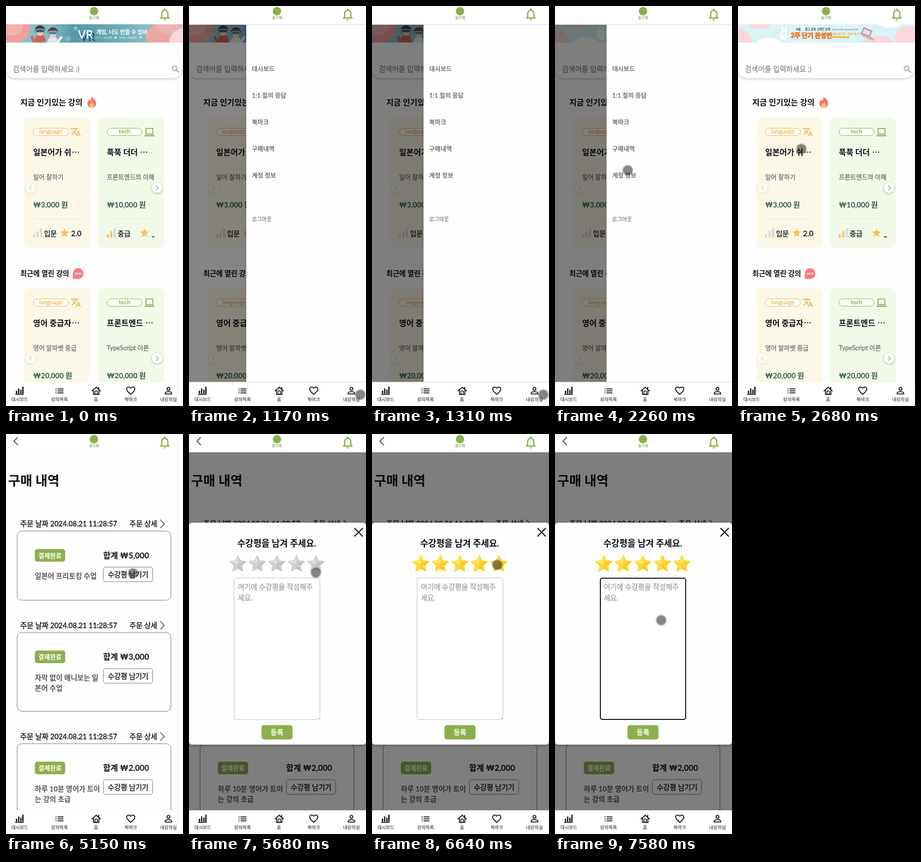
An HTML page with a canvas that plays this animation: 359 px wide and 810 px high, repeating every 8000 ms.

```html
<!DOCTYPE html>
<html lang="ko">
<head>
<meta charset="utf-8">
<title>강의 앱</title>
<style>
html, body { margin: 0; width: 100%; height: 100%; overflow: hidden; background: #fefefe; }
canvas { display: block; width: 100vw; height: 100vh; }
</style>
</head>
<body>
<canvas id="stage"></canvas>
<script>
const W = 359, H = 810, TOP = 37, BOTTOM = 762, LOOP = 8000;
const PAGE = '#fefefe', INK = '#0b0f19', GREEN = '#8ab04d', AMBER = '#edb550', GOLD = '#f7c35f', GREY = '#d9d9d9';
const FONT = 'Lato, "Noto Sans CJK KR", "Noto Sans CJK JP", "Noto Sans CJK", sans-serif';
const canvas = document.getElementById('stage');
const c = canvas.getContext('2d');

const ICONS = {
  bell: 'M12 22c1.1 0 2-.9 2-2h-4c0 1.1.9 2 2 2zm6-6v-5c0-3.07-1.63-5.64-4.5-6.32V4c0-.83-.67-1.5-1.5-1.5s-1.5.67-1.5 1.5v.68C7.64 5.36 6 7.92 6 11v5l-2 2v1h16v-1l-2-2zm-2 1H8v-6c0-2.48 1.51-4.5 4-4.5s4 2.02 4 4.5v6z',
  heart: 'M16.5 3c-1.74 0-3.41.81-4.5 2.09C10.91 3.81 9.24 3 7.5 3 4.42 3 2 5.42 2 8.5c0 3.78 3.4 6.86 8.55 11.54L12 21.35l1.45-1.32C18.6 15.36 22 12.28 22 8.5 22 5.42 19.58 3 16.5 3zm-4.4 15.55l-.1.1-.1-.1C7.14 14.24 4 11.39 4 8.5 4 6.5 5.5 5 7.5 5c1.54 0 3.04.99 3.57 2.36h1.87C13.46 5.99 14.96 5 16.5 5c2 0 3.5 1.5 3.5 3.5 0 2.89-3.14 5.74-7.9 10.05z',
  person: 'M12 5.9a2.1 2.1 0 1 1 0 4.2 2.1 2.1 0 0 1 0-4.2m0 9c2.97 0 6.1 1.46 6.1 2.1v1.1H5.9V17c0-.64 3.13-2.1 6.1-2.1M12 4a4 4 0 1 0 0 8 4 4 0 0 0 0-8zm0 9c-2.67 0-8 1.34-8 4v3h16v-3c0-2.66-5.33-4-8-4z',
  translate: 'M12.87 15.07l-2.54-2.51.03-.03c1.74-1.94 2.98-4.17 3.71-6.53H17V4h-7V2H8v2H1v1.99h11.17C11.5 7.92 10.44 9.75 9 11.35 8.07 10.32 7.3 9.19 6.69 8h-2c.73 1.63 1.73 3.17 2.98 4.56l-5.09 5.02L4 19l5-5 3.11 3.11.76-2.04zM18.5 10h-2L12 22h2l1.12-3h4.75L21 22h2l-4.5-12zm-2.62 7l1.62-4.33L19.12 17h-3.24z',
  laptop: 'M3 3h18v15H3zM5 5h14v11H5zM0.500 19.500h23v2.500h-23z',
  star: 'M12 17.27L18.18 21l-1.64-7.03L22 9.24l-7.19-.61L12 2 9.19 8.63 2 9.24l5.46 4.73L5.82 21z',
  flame: 'M11 1C16 4 21.5 9 21 15.5 20.5 21 16.5 24 12 24 7 24 3 20.5 3 15.5 3 11.5 5.5 9.5 6 6.5 7.5 7 8 8.5 8.2 10 10.5 8 11.5 5 11 1z',
  ember: 'M12.5 11C15 13 17 16 17 19 17 22 15 24 12 24 9 24 7 22 7 19.5 7 17 8.5 16 9 14.5 10 15 10.5 15.5 10.7 16.5 12 15 12.7 13 12.5 11z'
};
for (const k in ICONS) ICONS[k] = new Path2D(ICONS[k]);

const clamp = v => Math.max(0, Math.min(1, v));
const lerp = (a, b, k) => a + (b - a) * k;
const span = (t, a, b) => clamp((t - a) / (b - a));
const easeOut = k => 1 - (1 - k) ** 3;
const easeInOut = k => k * k * (3 - 2 * k);

function rect(x, y, w, h, color) { c.fillStyle = color; c.fillRect(x, y, w, h); }
function box(x, y, w, h, r, fill, stroke, lw = 1) {
  c.beginPath(); c.roundRect(x, y, w, h, r);
  if (fill) { c.fillStyle = fill; c.fill(); }
  if (stroke) { c.strokeStyle = stroke; c.lineWidth = lw; c.stroke(); }
}
function oval(x, y, rx, ry, color, turn = 0) {
  c.beginPath(); c.ellipse(x, y, rx, ry, turn, 0, 7); c.fillStyle = color; c.fill();
}
const dot = (x, y, r, color) => oval(x, y, r, r, color);
function line(color, lw, ...p) {
  c.beginPath();
  for (let i = 0; i < p.length; i += 2) c.lineTo(p[i], p[i + 1]);
  c.strokeStyle = color; c.lineWidth = lw; c.stroke();
}
// y is the optical middle of the line; a thin outline stands in for the medium weight
function text(s, x, y, size, color, weight = 400, align = 'left') {
  const base = y + size * 0.37;
  c.font = `${weight === 500 ? 400 : weight} ${size}px ${FONT}`;
  c.textAlign = align; c.fillStyle = color;
  c.fillText(s, x, base);
  if (weight === 500) {
    c.strokeStyle = color; c.lineWidth = size * 0.022;
    c.strokeText(s, x, base);
  }
}
function icon(name, x, y, scale, color) {
  c.save();
  c.translate(x, y); c.scale(scale, scale); c.translate(-12, -12);
  c.fillStyle = color; c.fill(ICONS[name], 'evenodd');
  c.restore();
}
function shadow(color, blur, dy) {
  const k = c.getTransform().a;
  c.shadowColor = color; c.shadowBlur = blur * k; c.shadowOffsetY = dy * k;
}
function clipped(x, y, w, h, draw) {
  c.save(); c.beginPath(); c.rect(x, y, w, h); c.clip(); draw(); c.restore();
}

function kid(x, y, hair, shirt, goggles) {
  oval(x, y + 19, 11, 11, shirt);
  oval(x, y - 1, 10.5, 10, hair);
  oval(x, y + 4, 7.5, 6.5, '#f4c4ab');
  box(x - 9, y - 3, 18, 7, 3, goggles, '#f0f4f2', 1);
}
function gameBanner() {
  const g = c.createLinearGradient(0, 0, W, 0);
  g.addColorStop(0, '#8fc6cf'); g.addColorStop(0.26, '#80bcc7');
  g.addColorStop(0.38, '#5698a9'); g.addColorStop(0.6, '#69a9b6'); g.addColorStop(1, '#a9d3d6');
  rect(0, TOP, W, 37, g);
  oval(14, 47, 35, 27, '#ef9f9c');
  oval(7, 41, 28, 19, '#f2b3ad');
  oval(345, 62, 62, 34, '#eaa6a0');
  oval(338, 42, 34, 15, '#e6b5af');
  dot(126, 66, 5, '#7cb6c4'); dot(141, 45, 4, '#8bc0cb');
  line('#d8605b', 5, 58, 76, 52, 61);
  line('#e9efed', 5, 103, 76, 113, 62);
  kid(69, 50, '#4a3740', '#d3625c', '#37607a');
  kid(95, 54, '#5f4140', '#dce9e6', '#438ba0');
  text('VR', 151, 62, 23, '#173a72');
  text('VR', 146, 57.5, 22.5, '#ffffff', 700);
  text('게임, 너도 만들 수 있어', 183, 53, 11, '#ffffff', 900);
  text('C++ - 24,000', 183, 63.5, 5.5, '#eef7f7');
  text('JAVA - 50,000', 230, 63.5, 5.5, '#eef7f7');
  dot(222, 63.5, 2.5, '#e9d6d0'); dot(273, 63.5, 2.5, '#e9d6d0');
}
function rabbit() {
  oval(90, 48, 2, 6, '#fff', -0.15); oval(97, 48, 2, 6, '#fff', 0.25);
  oval(93, 62, 7, 6.5, '#fff'); oval(93, 55, 6.5, 5, '#fff');
  dot(91, 54, 0.6, '#555'); dot(95, 54, 0.6, '#555');
  oval(93, 57, 1.2, 0.7, '#f29a9f');
}
function sprintBanner() {
  rect(0, TOP, W, 37, '#d9f3f8');
  oval(0, 74, 28, 28, '#fbd6da');
  oval(44, 34, 24, 12, '#fbd6da');
  oval(62, 78, 26, 14, '#ffffff');
  oval(284, 78, 34, 18, '#fbd6da');
  oval(308, 33, 26, 11, '#ffffff');
  oval(350, 66, 32, 25, '#fbd6da');
  rabbit();
  text('8월', 118, 47, 6, '#353535', 900);
  text('짧고 굵게, 임팩트 있게', 136, 47, 5.5, '#4a4a4a', 700);
  c.save(); c.lineJoin = 'round';
  text('2주 단기 완성반', 107, 59.5, 12.8, '#ec7a26', 900);
  c.strokeStyle = '#ec7a26'; c.lineWidth = 0.9;
  c.strokeText('2주 단기 완성반', 107, 64.2);
  c.restore();
  text('Python, HTML, TypeScript 단기반', 191, 47.5, 3.6, '#555');
  text('개강 8월 7일 / 종강 8월 18일', 191, 56, 5, '#f0a52d', 700);
  rect(191, 61, 35, 4, '#f3b64f');
  c.save(); c.translate(264, 56); c.rotate(0.4);
  box(-13, -8, 18, 13, 1, '#b9a9aa', '#8f8486');
  box(-11, -6, 14, 9, 0, '#e8dfdf');
  box(-9, 5, 24, 4, 1, '#cdbfc0', '#9d9294', 0.6);
  c.restore();
}
function banner(t) {
  const x = -W * easeInOut(span(t, 1700, 2200));
  clipped(0, TOP, W, 37, () => {
    c.translate(x, 0); gameBanner();
    c.translate(W, 0); sprintBanner();
  });
}

const LANG = { x: 37, tag: 'language', hue: AMBER, bg: '#fcf8e8', icon: 'translate' };
const TECH = { x: 186.5, tag: 'tech', hue: '#86ae50', bg: '#f3f9e8', icon: 'laptop' };
const CARDS = [
  { ...LANG, y: 226, title: '일본어가 쉬', dots: 96, sub: '일어 잘하기', price: '₩3,000 원', level: '입문', bars: 0, rate: '2.0' },
  { ...TECH, y: 226, title: '푹푹 더더', dots: 85, sub: '프론트엔드의 이해', price: '₩10,000 원', level: '중급', bars: 2, rate: '_' },
  { ...LANG, y: 571.5, title: '영어 중급자', dots: 96, sub: '영어 알파벳 중급', price: '₩20,000 원', level: '중급', bars: 2, rate: '_' },
  { ...TECH, y: 571.5, title: '프론트엔드', dots: 96, sub: 'TypeScript 이론', price: '₩20,000 원', level: '중급', bars: 2, rate: '_' }
];
function card(d) {
  c.save(); c.translate(d.x, d.y);
  box(0, 0, 134, 264, 10, d.bg);
  box(18.5, 21.5, 71, 15, 7.5, '#fffefa', d.hue);
  text(d.tag, 54, 28, 12, d.hue, d.tag === 'tech' ? 700 : 500, 'center');
  icon(d.icon, 104.5, 29, d.icon === 'laptop' ? 0.88 : 0.93, d.hue);
  text(d.title, 18, 70.5, 16, INK, 700);
  for (let i = 0; i < 3; i++) dot(d.dots + 3 + i * 5.3, 70, 1.2, INK);
  text(d.sub, 18, 120.5, 12.7, '#666c70', 500);
  text(d.price, 18, 177, 14.7, '#2b5a4c', 700);
  line('#e9e8da', 1, 18, 205.5, 116, 205.5);
  for (let i = 0; i < 3; i++) rect(18 + i * 7, 236 - i * 6, 4, 7 + i * 6, i < d.bars ? GOLD : GREY);
  text(d.level, 40, 234.5, 14.2, INK, 500);
  icon('star', d.rate === '_' ? 94.5 : 82, 233.5, 0.93, GOLD);
  text(d.rate, 116, 234.5, 15, INK, 500, 'right');
  c.restore();
}
function slideButton(x, y, dir, face, depth, mark) {
  c.save();
  shadow(`rgba(0,0,0,${depth})`, 4, 1);
  dot(x, y, 10.5, face);
  c.restore();
  line(mark, 1.8, x - 2 * dir, y - 4.5, x + 2.5 * dir, y, x - 2 * dir, y + 4.5);
}
function home(t) {
  banner(t);
  c.save(); shadow('rgba(0,0,0,.2)', 5, 2);
  box(0, 110, 357, 36, 18, '#fff'); c.restore();
  rect(0, 100, W, 14, PAGE);
  text('검색어를 입력하세요 :)', 14, 127.5, 14.5, '#8b8f93', 500);
  c.beginPath(); c.arc(342, 126, 4.8, 0, 7);
  c.strokeStyle = '#868686'; c.lineWidth = 1.4; c.stroke();
  line('#868686', 1.6, 345.5, 129.5, 351, 135);
  text('지금 인기있는 강의', 29, 195, 16.1, INK, 700);
  icon('flame', 174, 194.5, 0.98, '#f4736c');
  icon('ember', 174, 194.5, 0.98, '#fbc667');
  text('최근에 열린 강의', 29, 542, 14.3, INK, 700);
  box(135.5, 531, 21.5, 21.5, [10.5, 10.5, 10.5, 1], '#f97c7d');
  text('NEW', 146.3, 542, 5.8, '#fff', 900, 'center');
  CARDS.forEach(card);
  for (const y of [368, 713.5]) {
    slideButton(50, y, -1, '#fdfbf3', 0.12, '#dddcd6');
    slideButton(306.5, y, 1, '#fff', 0.3, '#a9adb0');
  }
}

const ORDERS = [
  { y: 196.5, h: 140, total: '₩5,000', name: ['일본어 프리토킹 수업'] },
  { y: 402, h: 159.5, total: '₩3,000', name: ['자막 없이 애니보는 일', '본어 수업'] },
  { y: 627, h: 159.5, total: '₩2,000', name: ['하루 10분 영어가 트이', '는 강의 초급'] }
];
function order(o) {
  c.save(); c.translate(0, o.y);
  text('주문 날짜 2024.08.21 11:28:57', 29, -14.5, 14.5, INK, 500);
  text('주문 상세', 250.5, -14.5, 14.3, INK, 500);
  line('#555', 1.8, 313, -23, 321, -14.5, 313, -6);
  box(22.5, 0, 312, o.h, 10, '#fefefe', '#777');
  box(58.5, 36.5, 61.5, 25.5, 5, GREEN);
  text('결제완료', 89.3, 49.5, 12.8, '#fff', 700, 'center');
  o.name.forEach((s, i) => text(s, 58.5, 91.5 + i * 21.5, 14.3, '#555', 700));
  text('합계 ' + o.total, 197, 49, 16.3, INK, 700);
  box(197.5, 73, 100, 29.5, 4.5, '#fff', '#777');
  text('수강평 남기기', 247.7, 88.5, 14.3, INK, 500, 'center');
  c.restore();
}
function orders() {
  text('구매 내역', 4.5, 94, 26.5, INK, 700);
  ORDERS.forEach(order);
}

const MENU = ['대시보드', '1:1 질의 응답', '북마크', '구매내역', '계정 정보'];
function drawer(open) {
  if (open <= 0) return;
  rect(0, TOP, W, BOTTOM - TOP, `rgba(0,0,0,${0.5 * open})`);
  const x = lerp(W, 104.5, open);
  c.save(); shadow('rgba(0,0,0,.3)', 4, 0);
  rect(x, TOP, 260, BOTTOM - TOP, PAGE); c.restore();
  MENU.forEach((s, i) => text(s, x + 11.5, 127.5 + 54 * i, 12.5, '#776e6b', 700));
  text('로그아웃', x + 11.5, 432, 10.9, '#776e6b', 500);
}

function ratingStar(x, y, lit) {
  const R = 16.8, p = i => {
    const r = i % 2 ? R * 0.48 : R, a = i * Math.PI / 5 - Math.PI / 2;
    return [x + r * Math.cos(a), y + r * Math.sin(a)];
  };
  const path = (...ids) => { c.beginPath(); ids.forEach(i => c.lineTo(...(i < 0 ? [x, y] : p(i)))); c.closePath(); };
  c.save(); c.lineJoin = 'round';
  path(0, 1, 2, 3, 4, 5, 6, 7, 8, 9);
  c.fillStyle = c.strokeStyle = lit ? '#fdd835' : '#cfcfcf';
  c.lineWidth = 2.6; c.fill(); c.stroke();
  path(0, -1, 9); c.fillStyle = lit ? '#ffe76a' : '#e0e0e0'; c.fill();
  path(8, -1, 9); c.fill();
  path(4, -1, 5); c.fillStyle = lit ? '#f7c52e' : '#bebebe'; c.fill();
  path(2, -1, 3); c.fill();
  c.restore();
}
function modal(t) {
  rect(0, TOP, W, BOTTOM - TOP, 'rgba(0,0,0,.5)');
  c.save(); shadow('rgba(0,0,0,.35)', 6, 1);
  box(0, 179.5, W, 449.5, 6, PAGE); c.restore();
  line('#0a0a0a', 2.2, 335.5, 190.5, 352.5, 207.5);
  line('#0a0a0a', 2.2, 352.5, 190.5, 335.5, 207.5);
  text('수강평을 남겨 주세요.', 178, 221.5, 17.8, INK, 700, 'center');
  for (let i = 0; i < 5; i++) ratingStar(99 + i * 39.6, 263.5, t >= 6240);
  const focus = t >= 7050;
  if (focus) box(92, 292, 173, 286, 4, '#fff', '#101318', 2);
  else {
    box(91.5, 291.5, 174, 287, 4, '#fff', '#bfc2c5');
    line('#555', 0.8, 262.5, 577, 265, 574.5);
  }
  text('여기에 수강평을 작성해주', 99, 309.5, 14.3, '#9ba0a6', 500);
  text('세요.', 99, 331.5, 14.3, '#9ba0a6', 500);
  if (focus && t < 7580) rect(99.5, 299, 1, 20, '#111');
  box(147, 589.5, 63, 29, 5, GREEN);
  text('등록', 178.5, 604, 14.2, '#fff', 700, 'center');
}

function header(back) {
  rect(0, 0, W, TOP, '#fff');
  dot(178.5, 10.5, 8.5, GREEN);
  text('솔무재', 178.5, 23.5, 7.2, '#7ea148', 500, 'center');
  icon('bell', 322, 16.8, 1.25, GREEN);
  if (back) line('#555', 2, 24, 6.5, 16, 14.5, 24, 22.5);
}
function nav() {
  const ink = '#111';
  rect(0, BOTTOM, W, H - BOTTOM, '#fff');
  [[20, 779], [24.5, 774.5], [29, 777], [33, 771]].forEach(([x, y]) => rect(x, y, 2.6, 785 - y, ink));
  rect(18.5, 785.5, 17.5, 1.8, ink);
  for (let i = 0; i < 3; i++) {
    rect(100.5, 774.5 + i * 4, 2, 1.8, ink);
    rect(104.5, 774.5 + i * 4, 12, 1.8, ink);
  }
  line(ink, 1.8, 174, 780, 183, 772, 192, 780);
  line(ink, 1.8, 177.5, 778, 177.5, 786.5, 188.5, 786.5, 188.5, 778);
  box(180.5, 779.5, 5, 7, 1, null, ink, 1.5);
  rect(187, 771.5, 2, 5, ink);
  icon('heart', 253, 779, 0.92, ink);
  icon('person', 329.5, 779, 0.95, ink);
  [['대시보드', 28], ['강의목록', 108.5], ['홈', 182.5], ['북마크', 253], ['내강의실', 329.5]]
    .forEach(([s, x]) => text(s, x, 797, 9.2, '#444', 500, 'center'));
}

// start, end, target x, target y
const MOVES = [[1590, 2410, 128.5, 289.5], [4100, 4620, 257.5, 282], [5640, 5890, 256, 263.5], [6570, 6640, 254, 265], [6640, 7000, 215.5, 377]];
function cursor(t) {
  if (t < 960) return;
  let x = 347.5, y = 787;
  for (const [a, b, tx, ty] of MOVES) {
    const k = easeInOut(span(t, a, b));
    x = lerp(x, tx, k); y = lerp(y, ty, k);
  }
  dot(x, y, 11.5, 'rgba(70,70,50,.25)');
  dot(x, y, 9.5, 'rgba(0,0,0,.36)');
}

function draw(t) {
  rect(0, 0, W, H, PAGE);
  const ordered = t >= 3490;
  const open = easeOut(span(t, 920, 1310)) * (1 - easeInOut(span(t, 2430, 2670)));
  clipped(0, TOP, W, BOTTOM - TOP, () => {
    if (ordered) orders(); else home(t);
    drawer(open);
    if (t >= 5220) modal(t);
  });
  header(ordered);
  nav();
  if (open > 0) {
    rect(0, TOP, W, 1, '#dcdcdc');
    rect(0, BOTTOM - 1, W, 1, '#d4d4d4');
  }
  cursor(t);
}

function resize() {
  const dpr = window.devicePixelRatio || 1;
  canvas.width = Math.round(innerWidth * dpr);
  canvas.height = Math.round(innerHeight * dpr);
}
addEventListener('resize', resize);
resize();

const start = performance.now();
function frame() {
  c.setTransform(canvas.width / W, 0, 0, canvas.height / H, 0, 0);
  draw((performance.now() - start) % LOOP);
  requestAnimationFrame(frame);
}
frame();
</script>
</body>
</html>
```
